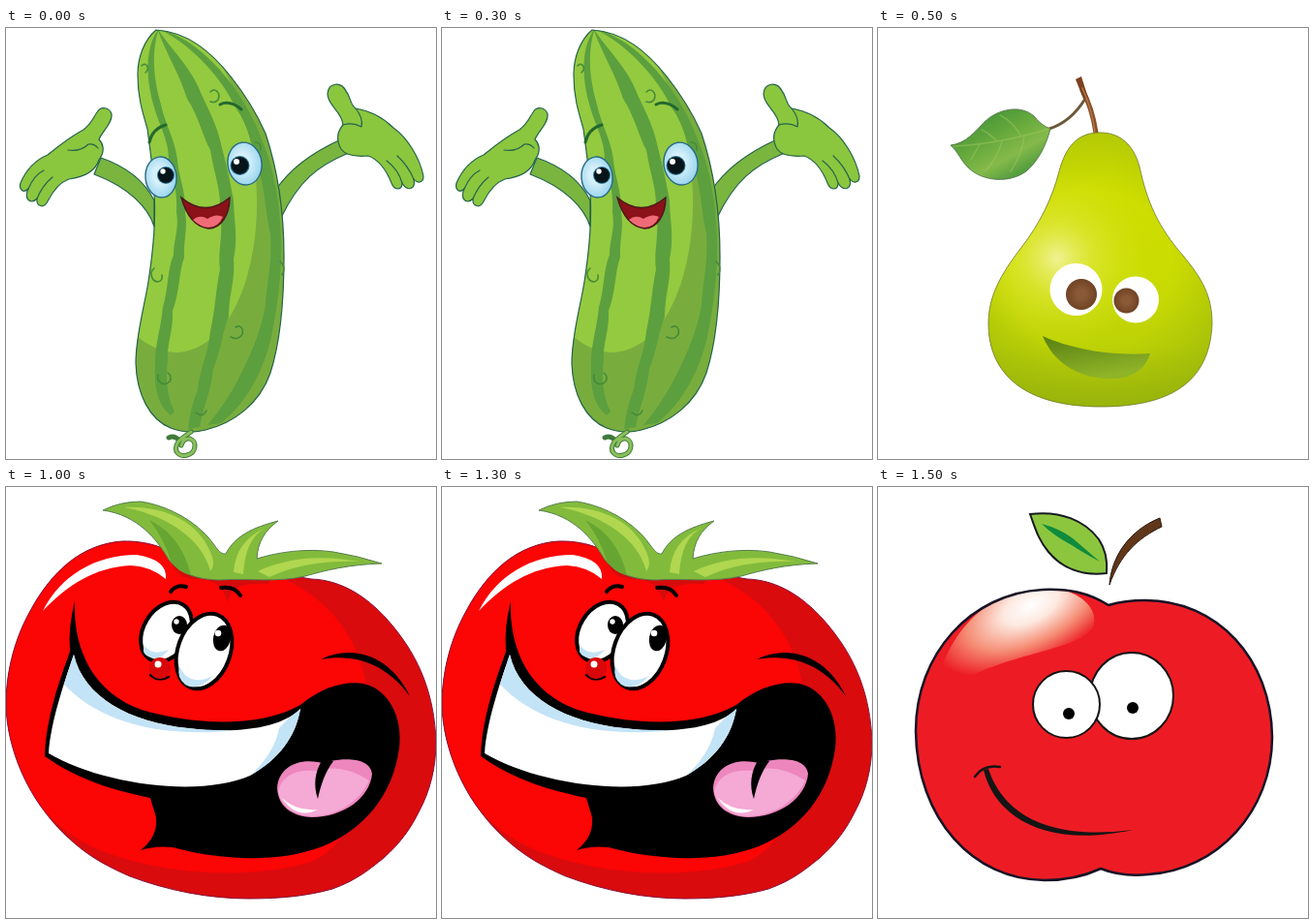
Write an HTML page that moves like this. It is 444 px wide and 445 px high and loops after 2 s.

```html
<!DOCTYPE html>
<html lang="en">
<head>
<meta charset="utf-8">
<title>Fruit and vegetable faces</title>
<style>
html, body { margin: 0; width: 100%; height: 100%; overflow: hidden; background: #fff; }
svg { display: block; width: 100%; height: 100%; }
.pic { opacity: 0; }
.line { fill: none; stroke-linecap: round; stroke-linejoin: round; }
</style>
</head>
<body>
<svg viewBox="0 0 444 445" preserveAspectRatio="none">
<defs>
  <path id="cuke" d="M155 2C143 12 136 30 136 48C136 70 140 84 146 104C149 128 152 145 153 170C155 200 152 230 147 262C142 292 134 318 134 346C135 378 148 404 170 413Q188 420 206 415C235 408 262 388 273 356C283 325 287 280 287 236C287 196 283 154 268 109C258 86 247 69 232 50C212 25 188 4 155 2Z"/>
  <clipPath id="cukeClip"><use href="#cuke"/></clipPath>
  <radialGradient id="cukeEye" cx=".45" cy=".45" r=".55">
    <stop offset=".35" stop-color="#d6f0fa"/><stop offset="1" stop-color="#9bd6ee"/>
  </radialGradient>

  <path id="pear" d="M227 108C250 107 264 121 270 143C278 180 289 205 315 235C335 259 345 277 345 305C343 361 308 391 230 391C151 391 114 357 114 305C114 277 127 254 147 228C168 201 180 175 187 148C194 122 206 109 227 108Z"/>
  <linearGradient id="pearSkin" x1="0" y1="0" x2="0" y2="1">
    <stop offset="0" stop-color="#d0df00"/><stop offset=".5" stop-color="#cbdc02"/>
    <stop offset=".78" stop-color="#bdd206"/><stop offset="1" stop-color="#a0b90b"/>
  </linearGradient>
  <radialGradient id="pearGlow" gradientUnits="userSpaceOnUse" cx="185" cy="238" r="95">
    <stop offset="0" stop-color="#f4f5a4" stop-opacity=".9"/>
    <stop offset=".4" stop-color="#e6ec50" stop-opacity=".5"/>
    <stop offset="1" stop-color="#d6e414" stop-opacity="0"/>
  </radialGradient>
  <radialGradient id="pearEdge" gradientUnits="userSpaceOnUse" cx="222" cy="250" r="150">
    <stop offset=".55" stop-color="#8fae0c" stop-opacity="0"/><stop offset="1" stop-color="#8fae0c" stop-opacity=".5"/>
  </radialGradient>
  <linearGradient id="pearLeaf" x1="0" y1="0" x2=".8" y2="1">
    <stop offset="0" stop-color="#2f8636"/><stop offset=".45" stop-color="#64a83c"/>
    <stop offset=".7" stop-color="#85ba4a"/><stop offset="1" stop-color="#388d38"/>
  </linearGradient>
  <linearGradient id="pearMouth" x1="0" y1="0" x2=".4" y2="1">
    <stop offset="0" stop-color="#587f12"/><stop offset="1" stop-color="#8fb428"/>
  </linearGradient>
  <radialGradient id="iris"><stop offset=".3" stop-color="#8a5936"/><stop offset="1" stop-color="#6f4325"/></radialGradient>

  <path id="tomato" d="M200 92C180 66 150 55 120 56C78 59 47 87 25 128C7 160 0 195 0 225C1 270 22 322 62 360C84 381 103 391 128 402C168 417 210 425 251 425C285 425 312 422 337 415C362 406 375 395 390 383C408 367 418 352 426 336C438 314 444 290 444 262C442 215 428 178 399 143C375 114 347 96 315 95L262 86Z"/>
  <clipPath id="tomatoClip"><use href="#tomato"/></clipPath>
  <path id="teeth" d="M70 173C80 217 128 243 188 249C240 255 284 249 304 229C299 258 282 281 252 298C200 321 98 307 44 275C46 243 60 202 70 173Z"/>
  <clipPath id="teethClip"><use href="#teeth"/></clipPath>

  <path id="apple" d="M238 122C217 109 198 105 170 106C96 110 39 172 39 252C40 343 99 406 172 406C197 406 215 401 230 394C245 400 259 402 279 400C350 396 407 335 407 258C406 177 350 117 276 117Q255 117 238 122Z"/>
  <clipPath id="appleClip"><use href="#apple"/></clipPath>
  <radialGradient id="shine" gradientUnits="userSpaceOnUse" cx="0" cy="0" r="1" gradientTransform="translate(158 122) rotate(-28) scale(112 58)">
    <stop offset="0" stop-color="#fff"/><stop offset=".28" stop-color="#fde9e0"/>
    <stop offset=".65" stop-color="#f58d75"/><stop offset="1" stop-color="#ed1c24"/>
  </radialGradient>
</defs>

<!-- Cucumber -->
<g class="pic">
  <g fill="#8bc63f" stroke="#24634a" stroke-width="1.2" stroke-linejoin="round">
    <g fill="#7ab540">
      <path d="M153 205C147 186 128 165 91 151L98 134C124 143 143 158 153 178Z"/>
      <path d="M278 168C293 145 315 129 346 115L354 129C322 142 302 158 284 196Z"/>
    </g>
    <path d="M96 136C103 127 100 119 96 115C100 106 110 98 109 89C107 82 98 80 94 87C90 93 88 99 80 105C67 112 54 122 43 131C31 136 21 146 15 160C13 167 18 171 23 166C18 177 26 183 32 176C31 184 39 187 43 179C48 169 54 160 65 156C80 154 92 149 96 136Z"/>
    <path d="M346 125C341 116 342 107 348 100C347 86 332 80 332 68C333 56 346 55 351 65C356 71 355 79 361 83C379 86 391 94 400 103C414 113 427 133 431 153C431 160 425 161 421 156C424 167 414 169 409 160C409 168 401 168 398 160C392 145 385 136 374 132C362 133 351 132 346 125Z"/>
  </g>
  <g class="line" stroke="#24634a" stroke-width="1.2">
    <path d="M23 166Q29 152 39 147M32 176Q38 162 48 154M64 126Q77 128 85 120Q91 119 95 124M421 156Q415 142 404 132M409 160Q405 146 393 137M361 83Q369 93 367 102Q358 97 348 100"/>
  </g>
  <use href="#cuke" fill="#94ca3f"/>
  <g clip-path="url(#cukeClip)">
    <path fill="#78ad3e" d="M222 38C250 85 263 145 258 205C253 266 229 330 178 335Q154 335 134 317V425H295V38Z"/>
    <g fill="#5c9f3e">
      <path d="M158 0C143 20 144 53 153 82C159 103 168 115 168 137C173 154 177 169 176 190C179 209 173 218 173 234C166 252 168 268 162 288C160 311 153 328 154 351C153 372 157 390 170 400L174 396C165 378 165 359 167 342C166 326 173 312 172 292C180 271 178 253 184 237C183 219 188 207 185 191C186 168 178 153 177 136C174 113 164 99 160 79C153 54 149 27 158 0Z"/>
      <path d="M156 0C164 24 179 47 187 73C199 91 203 112 211 126C215 152 222 165 221 190C225 214 218 231 221 249C216 274 216 291 211 313C209 336 200 352 198 373Q190 393 188 414L200 412C204 391 212 374 214 352C222 334 223 315 230 298C230 274 237 260 235 239C240 214 235 197 235 178C231 156 228 143 223 124C219 103 211 88 202 69C192 41 170 22 156 0Z"/>
      <path d="M160 2C194 19 224 54 237 82C251 101 254 124 260 143C268 168 268 193 273 212C275 244 269 263 268 286C262 319 248 347 237 368Q224 391 208 410L222 408C250 386 267 350 274 319C281 284 285 251 284 218C283 182 277 145 264 115C250 74 208 14 160 2Z"/>
    </g>
  </g>
  <use href="#cuke" fill="none" stroke="#24634a" stroke-width="1.2"/>
  <g class="line" stroke="#458b39" stroke-width="1.6">
    <path d="M211 66C216 61 222 67 219 74Q216 78 211 76M153 248C147 253 151 262 157 262Q162 261 161 255M232 319C239 323 246 318 244 311Q242 306 237 309M157 358C155 367 164 370 169 365Q172 360 167 356M140 39C145 34 149 42 144 46M257 118Q264 118 263 126M283 241Q290 247 285 255M196 397Q203 403 207 395"/>
  </g>
  <g class="line">
    <path id="curl" stroke="#3f7a3c" stroke-width="5" d="M191 417Q183 422 178 427C171 438 180 443 187 441C196 439 198 427 190 424Q183 423 181 431M179 426Q174 420 168 423"/>
    <path stroke="#8bc05a" stroke-width="3" d="M191 417Q183 422 178 427C171 438 180 443 187 441C196 439 198 427 190 424Q183 423 181 431"/>
  </g>
  <g class="line" stroke="#24682f" stroke-width="3">
    <path d="M148 118Q151 104 165 100M221 79Q231 74 243 84"/>
  </g>
  <g fill="url(#cukeEye)" stroke="#276b87" stroke-width="1.4">
    <ellipse cx="160" cy="154" rx="16" ry="21" transform="rotate(-5 160 154)"/>
    <ellipse cx="246.500" cy="140" rx="17.5" ry="22" transform="rotate(-8 247 140)"/>
  </g>
  <circle cx="165" cy="152" r="9" fill="#2b7895"/><circle cx="165" cy="152" r="8" fill="#07151b"/>
  <circle cx="241.500" cy="142" r="10" fill="#2b7895"/><circle cx="241.500" cy="142" r="9" fill="#07151b"/>
  <circle cx="162" cy="148" r="2.7" fill="#fff"/><circle cx="238" cy="138" r="3" fill="#fff"/>
  <path fill="#8b1218" stroke="#48191a" stroke-width="1.4" d="M181 175Q206 196 231 175C231 193 222 207 209 207C195 205 186 193 181 175Z"/>
  <path fill="#f06b78" d="M193 198Q200 192 208 197Q217 191 224 195Q219 206 209 206Q200 205 193 198Z"/>
</g>

<!-- Pear -->
<g class="pic">
  <g class="line">
    <path stroke="#6c5a3c" stroke-width="3" d="M177 104Q199 97 214 73"/>
    <path stroke="#8b4f29" stroke-width="5" d="M211 64Q221 82 225 108"/>
    <path fill="#7b4222" d="M204 53L210 50L217 72L212 73Z"/>
    <path stroke="#b07a48" stroke-width="1.4" d="M211 62Q221 84 224 107"/>
  </g>
  <path fill="url(#pearLeaf)" stroke="#4a6b42" stroke-width=".8" d="M75 121C91 119 100 107 110 97C124 83 148 79 161 91Q169 101 178 104C174 120 166 137 153 148C135 161 108 158 94 145C86 138 83 128 75 121Z"/>
  <g class="line" stroke="#a4cb62" stroke-width="1.4" opacity=".45">
    <path d="M78 122Q124 120 177 104M148 112Q139 96 126 90M123 117Q114 108 107 105M151 111Q149 130 137 148M128 117Q123 136 111 147M105 120L96 136"/>
  </g>
  <use href="#pear" fill="url(#pearSkin)"/>
  <use href="#pear" fill="url(#pearEdge)"/>
  <use href="#pear" fill="url(#pearGlow)" stroke="#70792e" stroke-width=".8"/>
  <g fill="#fff">
    <circle cx="204.500" cy="270" r="27"/>
    <circle cx="266" cy="280.500" r="24"/>
  </g>
  <g fill="url(#iris)">
    <circle cx="210" cy="275" r="16"/>
    <circle cx="256.500" cy="281.500" r="13"/>
  </g>
  <path fill="url(#pearMouth)" d="M170 318C200 332 245 339 281 336C276 355 258 363 237 362C206 361 181 345 170 318Z"/>
</g>

<!-- Tomato -->
<g class="pic">
  <use href="#tomato" fill="#d90b0d"/>
  <g clip-path="url(#tomatoClip)">
    <path fill="#fb0505" d="M-5 40H240L285 94C335 116 366 158 373 210C380 290 365 362 318 386C255 407 145 402 78 366Q30 337 -5 270Z"/>
    <path fill="#d60b0c" d="M171 80C181 98 194 94 208 96C221 99 226 110 229 119C232 103 244 99 270 100L285 85Z"/>
  </g>
  <use href="#tomato" fill="none" stroke="#851339" stroke-width="1"/>
  <path fill="#82bb3c" stroke="#567d4e" stroke-width="1" d="M100 24Q118 15 139 15C160 18 186 29 204 47C216 58 219 70 227 69C236 51 254 42 281 35C267 45 260 57 259 74C282 67 310 63 338 67Q363 71 388 79C354 80 330 86 309 92C280 99 247 94 222 96C199 96 180 90 168 75C156 54 136 29 100 24Z"/>
  <g fill="#b0d74f">
    <path d="M122 21C162 19 198 35 211 67Q217 80 211 87C203 55 169 30 122 21Z"/>
    <path d="M268 42Q247 53 245 90L235 88Q237 56 268 42Z"/>
    <path d="M260 87Q304 66 365 77Q310 75 272 93Z"/>
  </g>
  <path fill="#67a532" d="M148 34Q181 50 191 91Q177 88 170 76Q163 53 148 34Z"/>
  <path fill="#fff" d="M38 128C56 92 92 70 135 70Q167 75 165 95Q150 82 129 81C91 83 64 101 38 128Z"/>
  <path d="M71 118C69 170 92 213 140 230C190 245 260 250 304 225C326 207 349 200 369 203C396 209 410 239 406 270C399 319 370 353 327 371C278 390 215 384 172 372Q154 370 139 375Q157 361 155 341L149 321C110 313 74 302 40 278C41 240 55 200 66 170Q64 145 71 118Z"/>
  <use href="#teeth" fill="#fff"/>
  <g clip-path="url(#teethClip)" fill="#c3e3f7">
    <path d="M70 160L60 204C92 237 145 259 232 252L188 240Z"/>
    <path d="M310 220L282 249Q277 276 250 300L304 280Z"/>
  </g>
  <path fill="#ed86bd" d="M280 311C281 291 299 280 322 284Q328 286 335 283C355 279 376 281 378 296C376 321 348 341 316 341C294 340 281 329 280 311Z"/>
  <path fill="#f5a9d5" d="M281 314Q287 290 322 293Q346 285 375 303C365 326 340 340 316 340C295 339 283 328 281 314Z"/>
  <path fill="#fff" d="M285 321Q299 335 322 333Q300 344 285 321Z"/>
  <path d="M327 281C319 293 317 308 322 322C325 308 329 295 338 283Z"/>
  <g fill="#fff" stroke="#000" stroke-width="4">
    <ellipse cx="165.500" cy="149.500" rx="23.500" ry="33" transform="rotate(31 165.500 149.500)"/>
    <ellipse cx="204.500" cy="169.500" rx="27" ry="40" transform="rotate(20 204.500 169.500)"/>
  </g>
  <g fill="#c3e3f7">
    <path d="M143 164Q151 175 168 168Q157 182 145 174Q140 170 143 164ZM179 185Q189 207 214 195Q198 212 185 204Q176 197 179 185Z"/>
  </g>
  <ellipse cx="179" cy="142.500" rx="8" ry="9.500"/>
  <ellipse cx="223" cy="156" rx="9" ry="13.500" transform="rotate(12 223 156)"/>
  <circle cx="176" cy="139" r="2.700" fill="#fff"/><circle cx="219" cy="151" r="3.300" fill="#fff"/>
  <path class="line" stroke="#000" stroke-width="4" d="M170 108Q176 100 186 103M222 104Q236 102 242 112"/>
  <path class="line" stroke="#000" stroke-width="2.500" d="M149 194Q158 202 168 196"/>
  <circle cx="159" cy="187" r="11" fill="#d90709"/>
  <circle cx="157" cy="183" r="3.500" fill="#fff"/>
  <path d="M325 178C360 161 398 176 417 216C394 184 362 171 325 178Z"/>
</g>

<!-- Apple -->
<g class="pic">
  <use href="#apple" fill="#ed1c24"/>
  <g clip-path="url(#appleClip)">
    <path fill="url(#shine)" d="M58 218C67 158 107 104 176 104C209 106 229 126 222 145C207 171 116 171 58 218Z"/>
  </g>
  <use href="#apple" fill="none" stroke="#171326" stroke-width="2.5"/>
  <path fill="#8cc63f" stroke="#171a20" stroke-width="2" d="M157 28C189 24 214 35 228 54Q238 69 236 89C211 92 190 84 176 67C165 54 162 41 157 28Z"/>
  <path fill="#108b3d" d="M169 38Q188 43 201 53L229 77Q212 68 200 60Q181 50 169 38Z"/>
  <path fill="#613719" stroke="#29180f" stroke-width="1" d="M291 32L293 41C268 53 250 70 239 101C241 72 259 45 291 32Z"/>
  <g fill="#fff" stroke="#151515" stroke-width="2">
    <ellipse cx="262" cy="215.500" rx="43" ry="44.500"/>
    <circle cx="194.500" cy="224.500" r="34.500"/>
  </g>
  <circle cx="197" cy="234" r="6"/><circle cx="263" cy="228" r="6"/>
  <path fill="#151515" d="M109 292L114 291C128 333 169 366 263 354C171 374 120 339 109 292Z"/>
  <path class="line" stroke="#151515" stroke-width="2.5" d="M100 299Q109 286 126 289"/>
</g>
</svg>
<script>
const HOLD = 500;
const pics = [...document.querySelectorAll(".pic")];
const loop = HOLD * pics.length;
const share = 1 / pics.length;

// Each picture shows for its own quarter of the loop, with hard cuts.
pics.forEach((pic, i) => pic.animate([
  { opacity: 1, offset: 0, easing: "step-end" },
  { opacity: 0, offset: share },
  { opacity: 0, offset: 1 }
], { duration: loop, delay: i * HOLD - loop, iterations: Infinity }));
</script>
</body>
</html>
```
